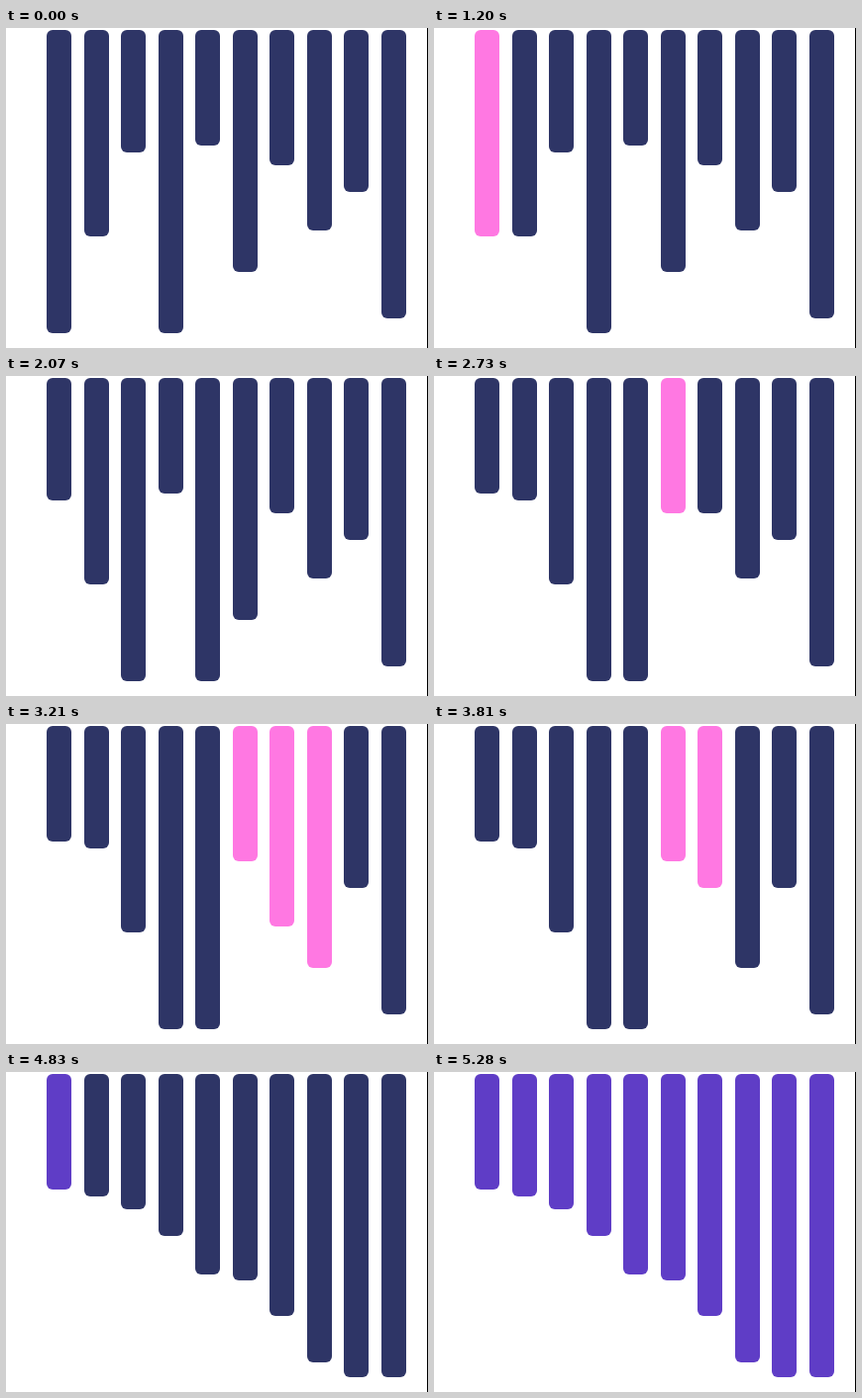
An HTML page that plays this animation: 426 px wide and 324 px high, repeating every 5.85 s.

```html
<!DOCTYPE html>
<html lang="en">
<head>
<meta charset="utf-8">
<title>Merge sort</title>
<style>
  html, body { margin: 0; width: 100%; height: 100%; overflow: hidden; background: #fff; }
  #stage { position: relative; width: 426px; height: 324px; overflow: hidden; }
  #stage::after { content: ""; position: absolute; top: 0; right: 0; width: 1px; height: 100%; background: #000; }
  .bar { position: absolute; top: 2px; width: 25px; border-radius: 6px; }
</style>
</head>
<body>
<div id="stage"></div>
<script>
const LOOP = 5850, TICK = 30;
// Timing in ms: first merge, between writes, highlight after the last write, pause between merges
const BEGIN = 1200, STEP = 50, HOLD = 60, PAUSE = 170, SWEEP_STEP = 53;
const IDLE = '#2e3566', ACTIVE = '#ff78e2', DONE = '#5f3dc6';
const start = [307, 209, 124, 307, 117, 245, 137, 203, 164, 292];

const merges = [];
let clock = BEGIN;

function planSort(lo, hi) {
  if (hi - lo < 1) return;
  const mid = (lo + hi) >> 1;
  planSort(lo, mid);
  planSort(mid + 1, hi);
  const clear = clock + (hi - lo + 1) * STEP + HOLD;
  merges.push({ lo, hi, begin: clock, clear });
  clock = clear + PAUSE;
}
planSort(0, start.length - 1);
const sweepBegin = merges[merges.length - 1].clear;

const stage = document.getElementById('stage');
const bars = start.map((_, i) => {
  const bar = document.createElement('div');
  bar.className = 'bar';
  bar.style.left = Math.round(41.4 + 37.5 * i) + 'px';
  return stage.appendChild(bar);
});

function stateAt(t) {
  const heights = [...start];
  const colors = start.map(() => IDLE);
  for (const { lo, hi, begin, clear } of merges) {
    if (t < begin) break;
    const sorted = heights.slice(lo, hi + 1).sort((a, b) => a - b);
    sorted.forEach((height, k) => {
      if (t < begin + k * STEP) return;
      heights[lo + k] = height;
      if (t < clear) colors[lo + k] = ACTIVE;
    });
  }
  colors.forEach((_, i) => {
    if (t >= sweepBegin + i * SWEEP_STEP) colors[i] = DONE;
  });
  return { heights, colors };
}

function draw() {
  const t = performance.now() % LOOP;
  const { heights, colors } = stateAt(Math.floor(t / TICK) * TICK);
  bars.forEach((bar, i) => {
    bar.style.height = heights[i] + 'px';
    bar.style.background = colors[i];
  });
  requestAnimationFrame(draw);
}
draw();
</script>
</body>
</html>
```
